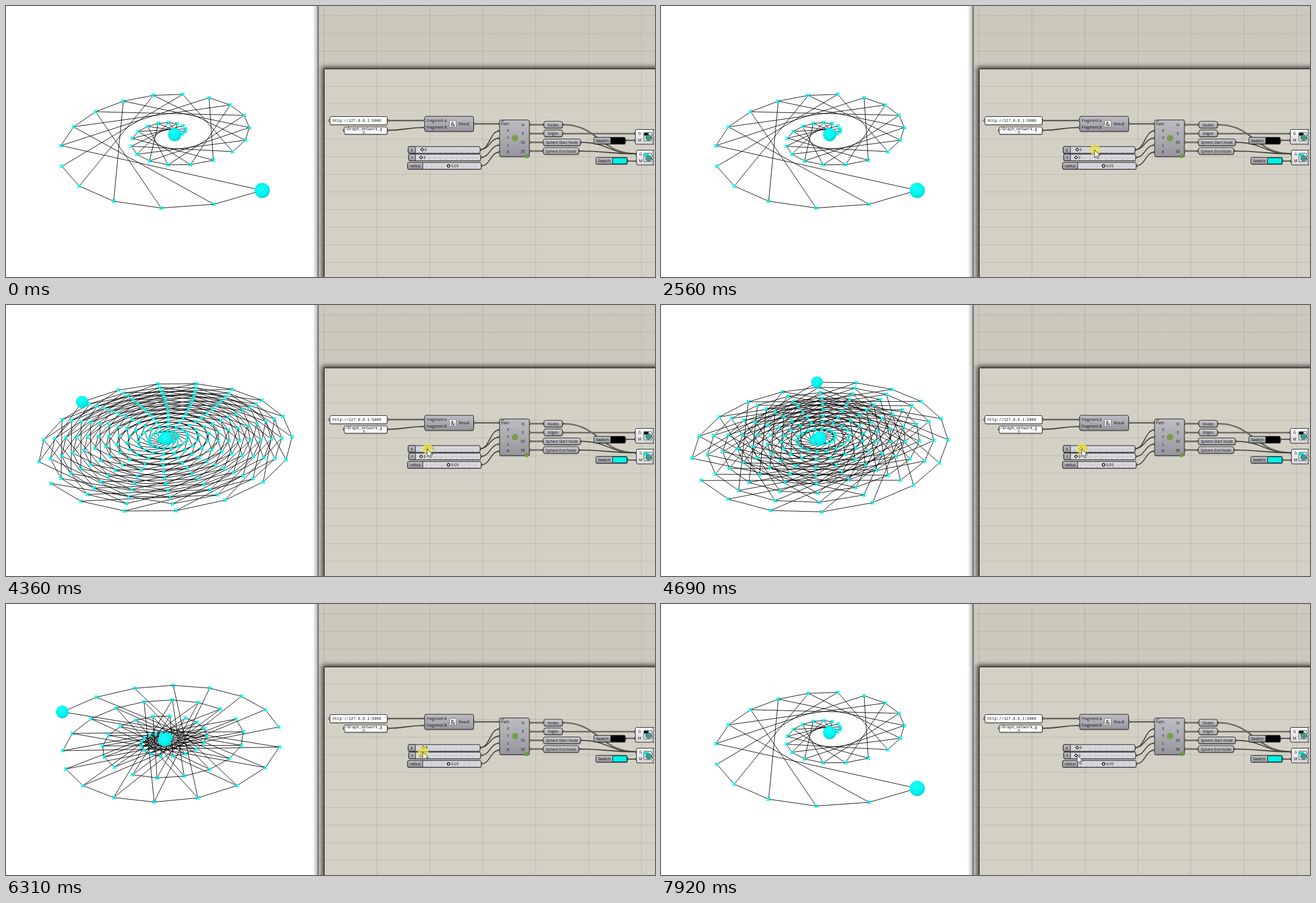
Recreate the animation shown at these times as an HTML page. Size 1157 by 484 pixels, loop 7990 ms.

```html
<!DOCTYPE html>
<html lang="en">
<head>
<meta charset="utf-8">
<title>Grid graph on a spiral</title>
<style>
html, body { margin: 0; width: 100%; height: 100%; overflow: hidden; background: #fff; }
svg { display: block; width: 100vw; height: 100vh; }
text { font: 6.7px "Open Sans", "Noto Sans", sans-serif; fill: #111; }
.mono { font: 6.9px "Liberation Mono", monospace; }
</style>
</head>
<body>
<svg id="stage" viewBox="0 0 1157 484" preserveAspectRatio="none">
  <defs>
    <pattern id="hatch" width="3" height="3" patternUnits="userSpaceOnUse">
      <path d="M0 3L3 0" stroke="#000" stroke-opacity=".09" stroke-width=".8"/>
    </pattern>
    <linearGradient id="body" x2="0" y2="1">
      <stop stop-color="#bdbcc2"/><stop offset=".5" stop-color="#abaab1"/><stop offset="1" stop-color="#96959d"/>
    </linearGradient>
    <linearGradient id="tag" x2="0" y2="1">
      <stop stop-color="#d0cfd3"/><stop offset="1" stop-color="#a3a2a9"/>
    </linearGradient>
    <linearGradient id="track" x2="0" y2="1">
      <stop stop-color="#c6c6cc"/><stop offset=".4" stop-color="#dedee3"/><stop offset="1" stop-color="#d0d0d6"/>
    </linearGradient>
    <linearGradient id="pale" x2="0" y2="1">
      <stop stop-color="#fafafa"/><stop offset="1" stop-color="#d6d6d8"/>
    </linearGradient>
    <linearGradient id="fade">
      <stop stop-color="#000" stop-opacity="0"/><stop offset="1" stop-color="#000" stop-opacity=".3"/>
    </linearGradient>
    <radialGradient id="ball" cx=".42" cy=".36" r=".65">
      <stop stop-color="#1cfffb"/><stop offset=".65" stop-color="#00f3f0"/><stop offset="1" stop-color="#00d3d3"/>
    </radialGradient>
    <filter id="blur" x="-10%" y="-10%" width="120%" height="120%"><feGaussianBlur stdDeviation="4"/></filter>
    <clipPath id="pane"><rect x="557" width="600" height="484"/></clipPath>
  </defs>
  <rect width="1157" height="484" fill="#fff"/>
  <g id="graph">
    <path id="edges" fill="none" stroke="#000" stroke-width=".95"/>
    <path id="marks" fill="none" stroke="#00f2ea" stroke-width="2.3"/>
    <circle id="first" fill="url(#ball)"/>
    <circle id="last" fill="url(#ball)"/>
  </g>
  <rect x="547" width="9" height="484" fill="url(#fade)"/>
  <g id="canvas" clip-path="url(#pane)"></g>
  <rect x="555.5" width="2" height="484" fill="#686763"/>
  <g id="badge">
    <path d="M880 269H902.5L905.500 266L908.500 269H933V278.500H880Z" fill="#d9542c" stroke="#5c2412" stroke-width=".8"/>
    <text id="cost" x="906" y="276.300" text-anchor="middle"></text>
  </g>
  <g id="knob">
    <path d="M-2.700 0L0 -2.700L2.700 0L0 2.700Z" fill="#fff" stroke="#111" stroke-width="1.200"/>
    <text id="count" x="4.300" y="2.500"></text>
  </g>
  <g id="cursor">
    <circle id="glow" cx=".5" cy="0" r="9.700" fill="#efe63a" fill-opacity=".72"/>
    <path d="M0 0V14L3.200 11.200L5.300 16L7.500 15L5.500 10.400H10Z" fill="#fff" stroke="#222" stroke-width=".9"/>
  </g>
</svg>
<script>
const $ = id => document.getElementById(id);
const LOOP = 7990;

// ---- Static node editor ----
const parts = [];
const add = s => parts.push(s);
const box = (x, y, x2, y2, fill, r = 2.5, line = '#222') =>
  add(`<rect x="${x}" y="${y}" width="${x2 - x}" height="${y2 - y}" rx="${r}" fill="${fill}" stroke="${line}"/>`);
const raised = (x, y, x2, y2, fill, r = 2.5) => {
  add(`<rect x="${x}" y="${y + 1.5}" width="${x2 - x + 1}" height="${y2 - y}" rx="${r}" fill="#000" opacity=".25"/>`);
  box(x, y, x2, y2, fill, r);
};
const label = (x, y, s, anchor = 'start', cls = '') =>
  add(`<text x="${x}" y="${y}" text-anchor="${anchor}" class="${cls}">${s}</text>`);
const grip = (x, y) => add(`<circle cx="${x}" cy="${y}" r="1.9" fill="#fff" stroke="#111"/>`);
const wire = (x, y, x2, y2, hollow) => {
  const m = (x2 - x) * .5;
  const d = `M${x} ${y}C${x + m} ${y} ${x2 - m} ${y2} ${x2} ${y2}`;
  add(`<path d="${d}" fill="none" stroke="#45443f" stroke-width="${hollow ? 2.6 : 1.8}"/>`);
  if (hollow) add(`<path d="${d}" fill="none" stroke="#aaa89f" stroke-width=".8"/>`);
};

function drawCanvas() {
  add('<rect x="557" width="600" height="484" fill="#d0cdc2"/><rect x="557" width="600" height="484" fill="url(#hatch)"/>');
  add('<rect x="564" y="109" width="640" height="420" fill="#000" opacity=".75" filter="url(#blur)"/>');
  add('<rect x="567.5" y="112.500" width="640" height="420" fill="#d3d0c6" stroke="#1c1c1a"/>');
  let grid = '';
  for (let x = 567; x < 1157; x += 94.35) grid += `M${x.toFixed(1)} 0V484`;
  for (let y = 17.65; y < 484; y += 31.45) grid += `M557 ${y.toFixed(1)}H1157`;
  add(`<path d="${grid}" stroke="#5a584c" stroke-opacity=".24" stroke-width=".8"/>`);

  wire(680, 204.500, 746, 204.500);
  wire(680, 222, 746, 217);
  wire(834, 210.500, 880, 210.500);
  wire(845, 256.500, 880, 223);
  wire(845, 256.500, 880, 236);
  wire(846, 270.500, 880, 248.500);
  wire(847, 285.500, 880, 261);
  for (const y of [212, 228, 243.500, 259]) wire(933, y, 959, y, true);
  wire(992, 212, 1124, 264, true);
  wire(992, 228, 1122, 228, true);
  wire(1024, 243.500, 1124, 264);
  wire(1021, 259, 1124, 264);
  wire(1104, 240, 1122, 240);
  wire(1108, 277, 1124, 277);

  // text panels
  for (const [x, y] of [[577, 204.500], [680, 204.500], [603, 222], [680, 222]]) grip(x, y);
  raised(577.500, 197.500, 679.500, 212, '#fff', 2);
  label(582, 206.500, 'http://127.0.0.1:5000', 'start', 'mono');
  raised(603, 216, 679.500, 229, '#fff', 2);
  label(604.500, 222, '/Graph_network_g', 'start', 'mono');
  label(638, 228.300, 'h', 'middle', 'mono');

  // concatenate
  for (const [x, y] of [[746, 204.500], [746, 217], [834, 210.500]]) grip(x, y);
  raised(746.500, 197, 833.500, 224, 'url(#body)');
  label(750, 206.800, 'Fragment A');
  label(750, 219.300, 'Fragment B');
  label(807, 213, 'Result');
  box(790.500, 204.500, 802.500, 216.500, '#f2f2f2', 1, '#777');
  add('<text x="796.5" y="214.500" text-anchor="middle" style="font-size:11px">&amp;</text>');

  // sliders
  for (const [name, x, split, x2, y] of [['X', 717, 730, 845, 251], ['Y', 718, 730, 846, 264.500], ['radius', 716, 743, 847, 279.500]]) {
    grip(x2, y + 6);
    raised(x, y, x2, y + 12, 'url(#track)', 2);
    box(x, y, split, y + 12, 'url(#body)', 2);
    label((x + split) / 2, y + 8.500, name, 'middle');
    let ticks = '';
    for (let t = split + 6; t < x2 - 2; t += 9.6) ticks += `M${t} ${y + 8.5}v2.500`;
    add(`<path d="${ticks}" stroke="#85858c" stroke-width=".6"/><path d="M${split + 5} ${y + 6}H${x2 - 4}" stroke="#b4b4bb" stroke-width=".7"/>`);
  }
  add('<path d="M737.300 270.500l2.700-2.700 2.700 2.700-2.700 2.700Z" fill="#fff" stroke="#111" stroke-width="1.200"/>');
  label(744, 273, '3');
  add('<circle cx="789" cy="285.500" r="2.300" fill="#fff" stroke="#111" stroke-width="1.400"/>');
  label(793.500, 288, '0.05');

  // remote component
  const ins = ['Path', 'X', 'Y', 'L', 'R'], outs = ['N', 'E', 'SS', 'SE'];
  ins.forEach((s, i) => grip(880, 210.500 + i * 12.600));
  outs.forEach((s, i) => grip(933.500, 212 + i * 15.700));
  raised(880, 203.500, 933, 269, 'url(#body)');
  ins.forEach((s, i) => label(897, 212.800 + i * 12.600, s, 'end'));
  outs.forEach((s, i) => label(921.500, 214.500 + i * 15.700, s, 'middle'));
  add('<path d="M883 205.500h5" stroke="#333"/><circle cx="907.500" cy="236" r="5.800" fill="#7c9c4a"/><circle cx="928" cy="268" r="3.700" fill="#6f9a43"/>');

  // output relays
  for (const [s, x, x2, y] of [['Nodes', 959, 992, 206], ['Edges', 959, 992, 221.500], ['Sphere Start Node', 958, 1024, 237.500], ['Sphere End Node', 958, 1021, 253]]) {
    grip(x, y + 6);
    grip(x2, y + 6);
    raised(x, y, x2, y + 12, 'url(#tag)', 3);
    label((x + x2) / 2, y + 8.500, s, 'middle');
  }

  // swatches
  for (const [x, y, c] of [[1048, 234.500, '#000'], [1051.500, 270.500, '#00f0e4']]) {
    grip(x + 56, y + 6);
    raised(x, y, x + 56, y + 12, 'url(#body)', 2);
    box(x + 30, y + .500, x + 55.500, y + 11.500, c, 1);
    label(x + 15, y + 8.500, 'Swatch', 'middle');
  }

  // previews with torn right edge
  for (const [x, y, c] of [[1122, 220.500, '#111'], [1124, 257.500, '#00e4dc']]) {
    grip(x, y + 7.500);
    grip(x, y + 19.500);
    let edge = `M${x + 2} ${y}H1155`;
    for (let i = 0; i < 4; i++) edge += 'l-2 3.300l2 3.300';
    add(`<path d="${edge}H${x + 2}q-2 0 -2-2V${y + 2}q0-2 2-2Z" fill="url(#pale)" stroke="#222"/>`);
    label(x + 7.500, y + 9.500, 'G', 'middle');
    label(x + 7.500, y + 21.500, 'M', 'middle');
    box(1137, y + 5.500, 1151.500, y + 20.500, '#d9e4ea', 1, '#555');
    add(`<rect x="1137.500" y="${y + 6}" width="8" height="5" fill="${c}"/>`);
    add(`<circle cx="1145.500" cy="${y + 14.500}" r="5" fill="#3f9d84" stroke="#205a66" stroke-width=".8"/>`);
  }
  $('canvas').innerHTML = parts.join('');
}

// ---- Spiral graph ----
const layouts = {};
function layout(n) {
  if (layouts[n]) return layouts[n];
  const pts = Array.from({ length: n * n }, (_, k) => [k * Math.cos(.35 * k), k * Math.sin(.35 * k)]);
  const mean = [0, 1].map(a => pts.reduce((s, p) => s + p[a], 0) / pts.length);
  const centred = pts.map(p => [p[0] - mean[0], p[1] - mean[1]]);
  const lim = Math.max(...centred.flat().map(Math.abs));
  return layouts[n] = centred.map(p => [p[0] / lim, p[1] / lim]);
}

// Perspective of the ground plane, fitted to a few anchors: grid size, node, screen x, y
const anchors = [
  [6, 35, 457, 329.500], [6, 34, 371, 354], [6, 32, 192, 348.500], [6, 30, 99.500, 286], [6, 27, 160, 189],
  [6, 24, 315, 157.500], [6, 20, 434, 217], [6, 15, 289, 283.500], [6, 12, 223, 250.500],
  [10, 99, 97, 194.500], [10, 96, 293, 142.500], [10, 91, 498.500, 250], [10, 87, 272, 361], [10, 83, 81, 265.500],
  [12, 143, 462, 324.500], [12, 141, 291, 372.500], [12, 137, 55, 270],
  [15, 224, 136, 173.500], [15, 220, 403, 150.500], [15, 217, 510, 236], [15, 213, 303, 367.500], [15, 210, 80, 319]
];
function fitCamera() {
  const m = Array.from({ length: 8 }, () => Array(9).fill(0));
  for (const [n, k, u, v] of anchors) {
    const [x, y] = layout(n)[k];
    for (const row of [[x, y, 1, 0, 0, 0, -u * x, -u * y, u], [0, 0, 0, x, y, 1, -v * x, -v * y, v]])
      for (let i = 0; i < 8; i++) for (let j = 0; j < 9; j++) m[i][j] += row[i] * row[j];
  }
  for (let c = 0; c < 8; c++) {
    let p = c;
    for (let r = c + 1; r < 8; r++) if (Math.abs(m[r][c]) > Math.abs(m[p][c])) p = r;
    [m[c], m[p]] = [m[p], m[c]];
    for (let r = 0; r < 8; r++) {
      if (r === c) continue;
      const f = m[r][c] / m[c][c];
      for (let j = c; j < 9; j++) m[r][j] -= f * m[c][j];
    }
  }
  return m.map((row, i) => row[8] / row[i]);
}
const cam = fitCamera();
function project([x, y]) {
  const w = cam[6] * x + cam[7] * y + 1;
  return [(cam[0] * x + cam[1] * y + cam[2]) / w, (cam[3] * x + cam[4] * y + cam[5]) / w, 12 / w];
}

let shown = 0;
function drawGraph(n) {
  if (n === shown) return;
  shown = n;
  const pts = layout(n).map(project), at = k => pts[k][0].toFixed(1) + ' ' + pts[k][1].toFixed(1);
  let edges = '', marks = '';
  pts.forEach((p, k) => {
    if ((k + 1) % n) edges += `M${at(k)}L${at(k + 1)}`;
    if (k + n < pts.length) edges += `M${at(k)}L${at(k + n)}`;
    marks += `M${at(k)}m-2.800-2.800l5.600 5.600m0-5.600l-5.600 5.600`;
  });
  $('edges').setAttribute('d', edges);
  $('marks').setAttribute('d', marks);
  [['first', pts[0]], ['last', pts[pts.length - 1]]].forEach(([id, [x, y, r]]) => {
    $(id).setAttribute('cx', x);
    $(id).setAttribute('cy', y);
    $(id).setAttribute('r', r);
  });
  $('knob').setAttribute('transform', `translate(${742 + (n - 6) * .9} 256.500)`);
  $('count').textContent = n;
}

// ---- Timeline ----
const sizes = [[0, 6], [3820, 7], [3890, 9], [3950, 12], [4040, 13], [4180, 14], [4330, 15],
  [4690, 13], [4790, 12], [4900, 11], [5010, 10], [5360, 9], [5490, 10], [5980, 9], [6090, 8], [6370, 7], [6440, 6]];
const costs = [[3880, 4110, '18ms'], [4780, 5170, '11ms'], [5360, 5490, '10ms']];
const path = [[330, 1078, 462], [860, 766, 258], [1060, 766, 257], [1540, 744, 255], [1740, 744, 255],
  [2490, 772, 257], [2560, 773, 257], [3290, 754, 257], [3420, 747, 258], [3490, 744, 257], [3820, 745, 257],
  [3960, 749, 256], [4360, 751, 257], [4690, 750, 257], [5090, 745, 257], [5700, 745, 257], [5830, 745, 260],
  [6100, 744, 261], [6310, 743, 264], [7100, 743, 264], [7450, 762, 276], [7780, 742, 270]];

function cursorAt(t) {
  const i = path.findIndex(p => p[0] > t);
  if (i < 0) return path[path.length - 1].slice(1);
  const [t0, x0, y0] = path[i - 1], [t1, x1, y1] = path[i];
  const f = (t - t0) / (t1 - t0), e = f * f * (3 - 2 * f);
  return [x0 + (x1 - x0) * e, y0 + (y1 - y0) * e];
}
const show = (id, on) => $(id).setAttribute('visibility', on ? 'visible' : 'hidden');

function draw(t) {
  drawGraph(sizes.filter(s => s[0] <= t).pop()[1]);
  const cost = costs.find(c => t >= c[0] && t < c[1]);
  show('badge', cost);
  if (cost) $('cost').textContent = cost[2];
  show('cursor', t >= 330);
  show('glow', t >= 330 && t < 7550);
  if (t >= 330) $('cursor').setAttribute('transform', `translate(${cursorAt(t).join(' ')})`);
}

drawCanvas();
const start = performance.now();
function tick() {
  draw((performance.now() - start) % LOOP);
  requestAnimationFrame(tick);
}
tick();
</script>
</body>
</html>
```
